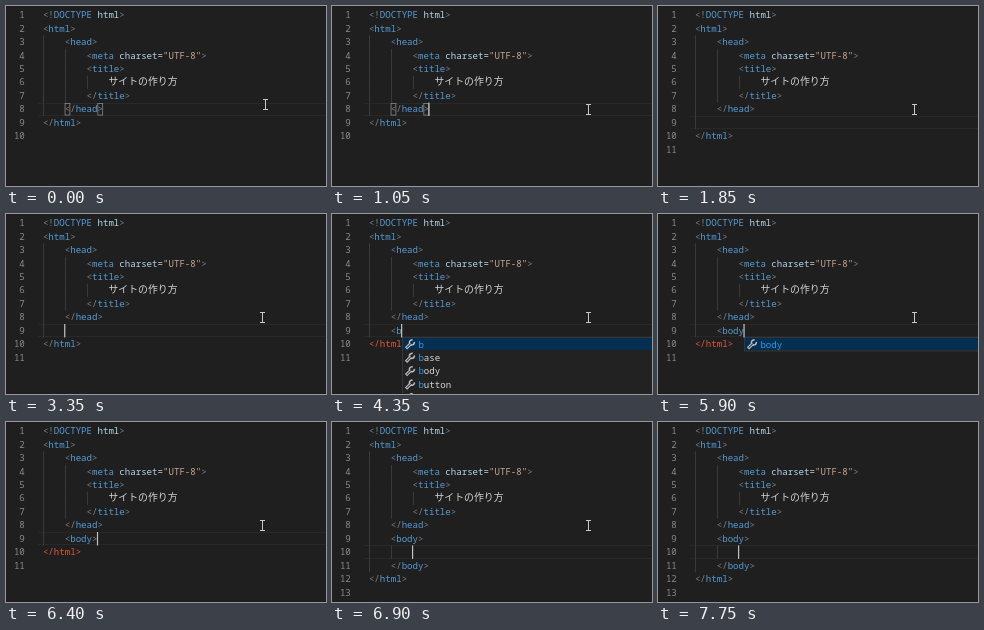
An HTML page with a canvas that plays this animation: 320x180 px, repeating every 7.8 s.

```html
<!DOCTYPE html>
<html lang="ja">
<head>
<meta charset="UTF-8">
<style>
html, body { margin: 0; width: 100%; height: 100%; overflow: hidden; background: #1f1f1f; }
canvas { display: block; width: 320px; height: 180px; }
</style>
</head>
<body>
<canvas></canvas>
<script>
const LOOP = 7800, PITCH = 13.45, CHAR = 5.46, LEFT = 36.9;
const MONO = '500 9.1px "Noto Sans Mono", "DejaVu Sans Mono", monospace';
const KANA = '9.9px "Noto Sans CJK JP", "Noto Sans CJK", sans-serif';
const COLORS = {
  bracket: '#808080', tag: '#569cd6', attr: '#b4d8ea', string: '#c8a592', text: '#d4d4d4', error: '#e0583f',
};

const HEAD = [
  '<!DOCTYPE html>',
  '<html>',
  '    <head>',
  '        <meta charset="UTF-8">',
  '        <title>',
  '            サイトの作り方',
  '        </title>',
  '    </head>',
];
const PAD = '    ';

// Each step: start time, lines after the head, caret row and column, extras.
const STEPS = [
  { at: 50, body: [], row: 7, col: 11, brackets: true },
  { at: 1350, body: [PAD], row: 8, col: 4 },
  typed(3550, '<', ['/html', 'a', 'abbr', 'address', 'area']),
  typed(4350, '<b', ['b', 'base', 'body', 'button', 'bdi']),
  typed(4750, '<bo', ['body', 'bdo', 'blockquote', 'button']),
  typed(5200, '<bod', ['body']),
  typed(5500, '<body', ['body']),
  typed(6350, '<body>'),
  { at: 6500, body: [PAD + '<body></body>'], row: 8, col: 10 },
  { at: 6750, body: [PAD + '<body>', PAD + PAD, PAD + '</body>'], row: 9, col: 8 },
];

function typed(at, text, menu) {
  return { at, body: [PAD + text], row: 8, col: 4 + text.length, menu, query: text.slice(1), error: true };
}

const canvas = document.querySelector('canvas');
const ctx = canvas.getContext('2d');
const ratio = window.devicePixelRatio || 1;
canvas.width = 320 * ratio;
canvas.height = 180 * ratio;

const colX = col => LEFT + col * CHAR;
const rowTop = row => 2.4 + row * PITCH;

function rect(x, y, w, h, color) {
  ctx.fillStyle = color;
  ctx.fillRect(x, y, w, h);
}

function write(text, x, baseline, color, font = MONO) {
  ctx.font = font;
  ctx.fillStyle = color;
  ctx.fillText(text, x, baseline);
}

function strokePath(color, width, points) {
  ctx.strokeStyle = color;
  ctx.lineWidth = width;
  ctx.beginPath();
  points.forEach(([x, y], i) => i ? ctx.lineTo(x, y) : ctx.moveTo(x, y));
  ctx.stroke();
}

function tokenKind(token, previous) {
  if (/[<>]/.test(token)) return 'bracket';
  if (previous[0] === '<') return 'tag';
  if (token[0] === '"') return 'string';
  return /[\w-]/.test(token) ? 'attr' : 'text';
}

function drawCode(line, row, error) {
  let previous = '';
  for (const match of line.matchAll(/<[/!]?|>|"[^"]*"|[\w-]+|=|[^\x00-\x7f]+/g)) {
    const token = match[0];
    const font = token.charCodeAt(0) > 127 ? KANA : MONO;
    const color = COLORS[error ? 'error' : tokenKind(token, previous)];
    write(token, colX(match.index), rowTop(row) + 9.8, color, font);
    previous = token;
  }
}

function drawGuides(lines) {
  lines.forEach((line, row) => {
    const depth = line.search(/\S|$/) / 4;
    for (let i = 0; i < depth; i++) rect(Math.round(colX(i * 4)), rowTop(row), 1, PITCH, '#3a3a3a');
  });
}

function drawWrench(x, y) {
  const handle = [[x - 4, y + 4], [x + 0.8, y - 0.8]];
  strokePath('#b9bec2', 3.2, handle);
  ctx.lineWidth = 1.5;
  ctx.beginPath();
  ctx.arc(x + 1.9, y - 1.9, 2.5, -0.2, Math.PI * 1.6);
  ctx.stroke();
  strokePath('#3a444c', 1.1, [[x - 3.3, y + 3.3], handle[1]]);
}

function drawMenu({ menu, query, row, col }) {
  const x = Math.round(colX(col)), y = Math.round(rowTop(row + 1));
  const height = menu.length * PITCH + 1;
  rect(x, y, 320 - x, height, '#343638');
  rect(x + 1, y + 1, 320 - x, height - 2, '#222223');
  rect(x + 1, y + 1, 320 - x, Math.round(PITCH) - 1, '#052f50');
  menu.forEach((word, i) => {
    const middle = y + 0.6 + (i + 0.5) * PITCH;
    drawWrench(x + 8, middle);
    let found = 0;
    [...word].forEach((letter, j) => {
      const hit = letter === query[found];
      if (hit) found++;
      write(letter, x + 16.4 + j * CHAR, middle + 3.2, hit ? '#2a9df0' : '#d4d4d4');
    });
  });
}

function drawPointer(time) {
  if (time >= 7450) return;
  const p = Math.min(1, Math.max(0, (time - 100) / 500));
  const move = p * p * (3 - 2 * p);
  const x = 259.5 - 3 * move, y = 98.5 + 5 * move;
  strokePath('#c8c8c8', 1, [[x, y - 5], [x, y + 5]]);
  for (const end of [y - 5, y + 5]) strokePath('#c8c8c8', 1, [[x - 2.5, end], [x + 2.5, end]]);
}

function draw(time) {
  const step = STEPS.findLast(s => s.at <= time) || STEPS[0];
  const lines = [...HEAD, ...step.body, '</html>', ''];
  const top = rowTop(step.row);
  ctx.setTransform(ratio, 0, 0, ratio, 0, 0);
  rect(0, 0, 320, 180, '#1f1f1f');

  rect(32, Math.round(top), 288, 1, '#282828');
  rect(32, Math.round(top + PITCH) - 1, 288, 1, '#282828');
  drawGuides(lines);

  lines.forEach((line, row) => {
    ctx.textAlign = 'right';
    write(String(row + 1), 18.8, rowTop(row) + 9.8, '#8a8a88');
    ctx.textAlign = 'left';
    drawCode(line, row, step.error && line === '</html>');
  });

  if (step.brackets) {
    ctx.strokeStyle = '#888';
    ctx.lineWidth = 0.8;
    for (const col of [4, 10]) ctx.strokeRect(colX(col) + 0.3, top + 0.9, CHAR - 0.6, PITCH - 1.8);
  }
  if (step.menu) drawMenu(step);
  if (Math.floor((time - step.at) / 500) % 2 === 0) {
    rect(colX(step.col) - 0.6, top, 1.2, PITCH, '#c4c5c3');
  }
  drawPointer(time);
}

const start = performance.now();
function tick() {
  draw((performance.now() - start) % LOOP);
  requestAnimationFrame(tick);
}
tick();
</script>
</body>
</html>
```
